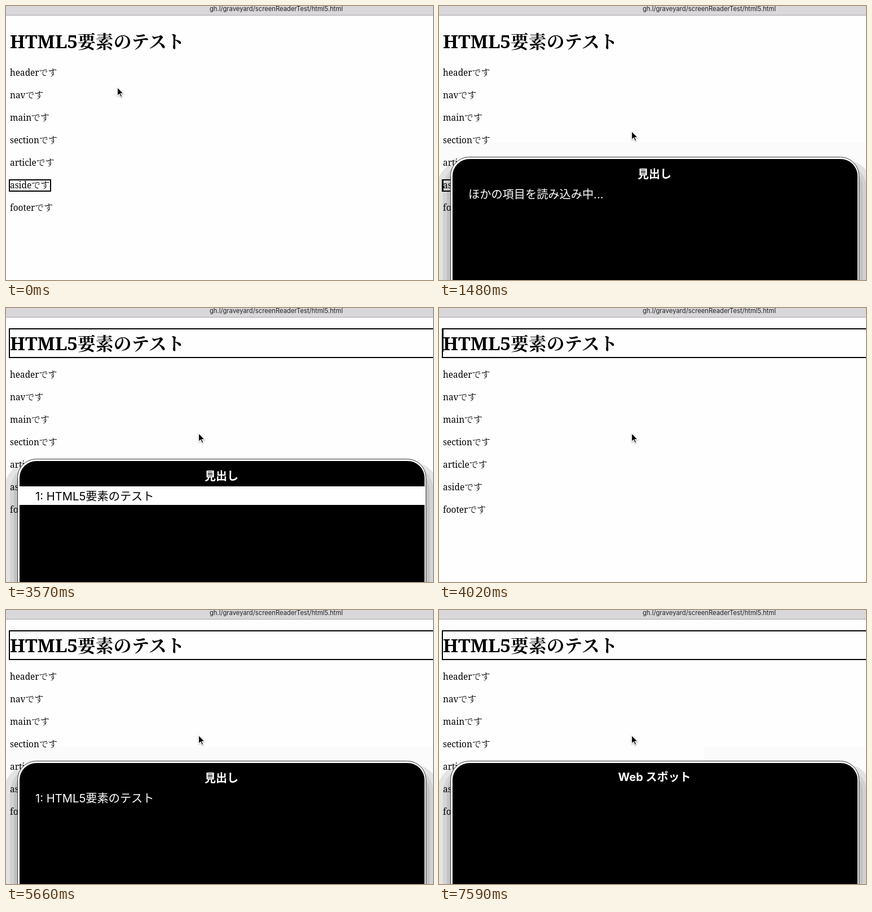
Write an HTML page that moves like this. It is 757x487 px and loops after 8 s.

```html
<!DOCTYPE html>
<html lang="ja">
<head>
<meta charset="utf-8">
<title>HTML5要素のテスト</title>
<style>
  html, body { margin: 0; width: 100%; height: 100%; overflow: hidden; background: #fefefe; }
  svg { display: block; width: 757px; height: 487px; }
  text { white-space: pre; }
  .page { font-family: "Noto Serif", "Noto Serif CJK JP", "Noto Sans CJK JP", serif; }
  .page .ja { font-family: "Noto Serif CJK JP", "Noto Sans CJK JP", serif; }
  .ui { font-family: Inter, "Noto Sans CJK JP", "Noto Sans CJK", sans-serif; }
  .frame { fill: none; stroke: #000; stroke-width: 2; }
</style>
</head>
<body>
<svg viewBox="0 0 757 487">
  <rect width="757" height="487" fill="#fefefe"/>
  <rect width="757" height="16" fill="#d9d7d9"/>
  <rect y="16" width="757" height="1" fill="#a9a7a9"/>
  <text class="ui" x="479" y="9" font-size="11.25" text-anchor="middle" fill="#222">gh.l/graveyard/screenReaderTest/html5.html</text>

  <g id="page" class="page">
    <text x="7" y="74.5" font-size="33" font-weight="600">HTML5<tspan class="ja" font-size="31.8">要素のテスト</tspan></text>
  </g>
  <rect id="headBox" class="frame" x="6" y="37" width="770" height="51"/>
  <rect id="asideBox" class="frame" x="6" y="309" width="73" height="20"/>
  <rect id="caret" x="7" width="1"/>

  <g id="panel" class="ui" font-size="20">
    <rect id="tint" y="243" width="757" height="244" fill="#fcfcfc" style="mix-blend-mode:multiply"/>
    <g fill="#000">
      <rect x="-4" y="274" width="773" height="300" rx="50" opacity=".1"/>
      <rect x="7" y="277" width="751" height="300" rx="48" opacity=".075"/>
      <rect x="14" y="280" width="737" height="300" rx="44" opacity=".08"/>
    </g>
    <rect x="20.5" y="268.5" width="724" height="300" rx="33" fill="#fff" stroke="#333"/>
    <rect x="24" y="272" width="718" height="300" rx="30"/>
    <text id="title" x="382" font-weight="700" text-anchor="middle" fill="#fff"></text>
    <rect id="bar" x="24" y="317" width="718" height="33" fill="#fff"/>
    <text id="row" x="52" y="341.5" font-size="20.2"></text>
  </g>

  <path id="cursor" d="M.5 .5V15.8L4 12.4L6.6 18L9 17L6.5 11.5H11.3Z" stroke="#fff" stroke-width="1.2"
    style="filter:drop-shadow(0 1px 1px rgba(0,0,0,.35))"/>
</svg>
<script>
const LOOP = 8000;
const $ = id => document.getElementById(id);
const show = (id, on) => { $(id).style.display = on ? '' : 'none'; };

['header', 'nav', 'main', 'section', 'article', 'aside', 'footer'].forEach((name, i) => {
  $('page').insertAdjacentHTML('beforeend',
    `<text x="7" y="${124 + i * 40}" font-size="15.4">${name}<tspan class="ja" font-size="16" font-weight="500">です</tspan></text>`);
});

const ITEM = '1: HTML5要素のテスト';
const HEADINGS = '見出し';

// time, title, row, row selected, left edge of the tint
const menus = [
  [0, ''],
  [1480, HEADINGS, 'ほかの項目を読み込み中...', false, 0],
  [1630, HEADINGS, ITEM, false, 0],
  [2820, HEADINGS, ITEM, true, 757],
  [4020, ''],
  [5660, HEADINGS, ITEM, false, 0],
  [6550, 'ウインドウスポット', '', false, 469],
  [7290, HEADINGS, ITEM, false, 469],
  [7590, 'Web スポット', '', false, 469]
];
const pointer = [[0, 197, 144], [140, 246, 176], [290, 341, 222]];
const blinks = [140, 590, 1040, 1630, 2080, 2520, 3120, 3570, 4020, 4470, 4910, 5510, 5960, 6550, 7000, 7440];

const at = (steps, t) => steps.filter(s => s[0] <= t).pop();

function render(t) {
  const [, title, row, selected, edge] = at(menus, t);
  show('panel', title);
  if (title) {
    $('title').textContent = title;
    $('title').setAttribute('y', title.startsWith('Web') ? 304 : 306);
    $('row').textContent = row;
    $('row').setAttribute('fill', selected ? '#000' : '#fff');
    $('tint').setAttribute('x', edge);
    show('bar', selected);
  }

  const onHeading = t >= 2820;
  show('headBox', onHeading);
  show('asideBox', !onHeading);

  const [top, height] = t >= 4020 ? [38, 40] : onHeading ? [308, 20] : [310, 18];
  $('caret').setAttribute('y', top);
  $('caret').setAttribute('height', height);
  show('caret', blinks.filter(b => b <= t).length % 2);

  const [, x, y] = at(pointer, t);
  $('cursor').setAttribute('transform', `translate(${x} ${y})`);
}

const start = performance.now();
function tick() {
  render((performance.now() - start) % LOOP);
  requestAnimationFrame(tick);
}
tick();
</script>
</body>
</html>
```
